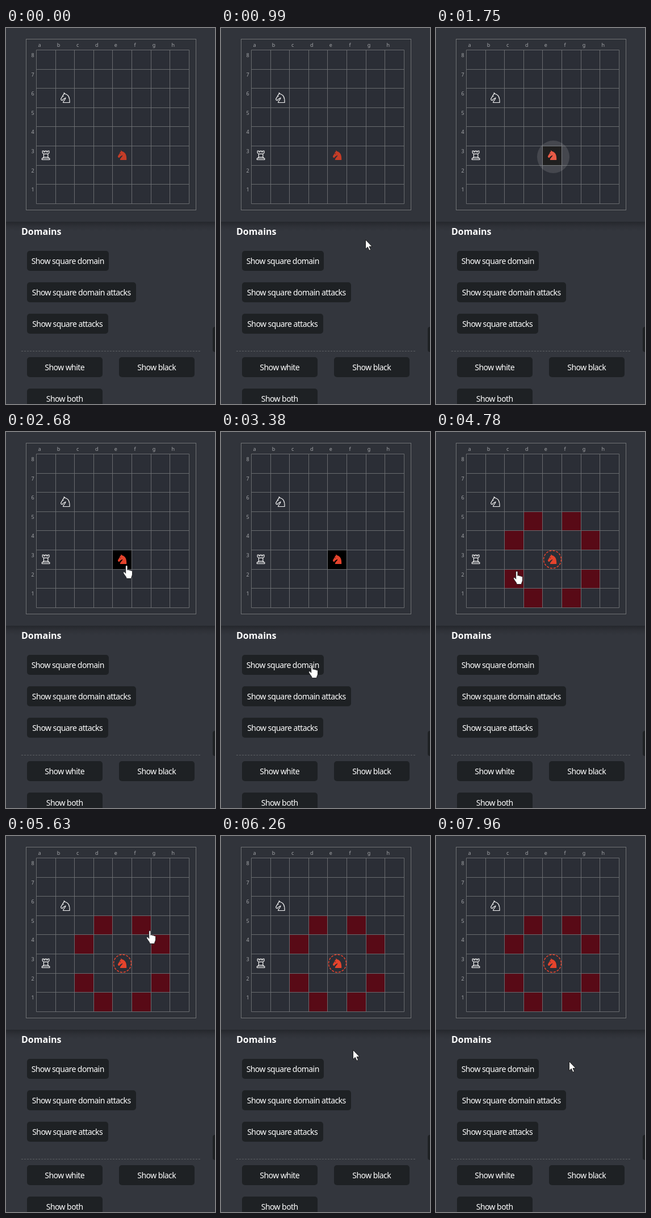
An HTML page that plays this animation: 368x658 px, repeating every 8000 ms.

```html
<!DOCTYPE html>
<html lang="en">
<head>
<meta charset="utf-8">
<title>Board domains</title>
<style>
  html, body { margin: 0; width: 100%; height: 100%; overflow: hidden; background: #33363d; }
  svg { display: block; width: 368px; height: 658px; }
  text { font-family: "Noto Sans", "Open Sans", sans-serif; fill: #fff; }
  .btn text { font-size: 14px; letter-spacing: -.57px; text-anchor: middle; }
  .btn rect { fill: #1e2124; }
  .label { font-size: 9px; fill: #a3a5a8; text-anchor: middle; }
  .title { font: 700 16px "Open Sans", "Noto Sans", sans-serif; }
</style>
</head>
<body>
<svg viewBox="0 0 368 658">
  <defs>
    <linearGradient id="shade" x1="0" y1="0" x2="0" y2="1">
      <stop offset="0" stop-color="#1d1f23" stop-opacity=".65"/>
      <stop offset=".5" stop-color="#1d1f23" stop-opacity=".22"/>
      <stop offset="1" stop-color="#1d1f23" stop-opacity="0"/>
    </linearGradient>
    <path id="horse" d="M6 0 L8.2 2 C13 3 16.3 7.5 15.8 17 H4.4 C4.4 13.4 8.8 11.8 8.8 8.6 C7.2 10 5.6 10 4.6 11.2 L3 13.2 L1 12.6 L.5 10.6 L3.8 5 C4 3.6 5 3 5.8 2.6 Z"/>
  </defs>
  <rect width="368" height="339" fill="#31343b"/>
  <rect y="339" width="368" height="16" fill="url(#shade)"/>
  <rect x="35.5" y="19.5" width="299" height="299" fill="#2e3138" stroke="#707275"/>
  <rect x="54" y="39" width="268" height="268" fill="#2b2e36"/>
  <g id="marks" fill="#580a16"></g>
  <path id="grid" fill="none" stroke="#707275" stroke-width=".9"/>
  <rect id="picked" x="188" y="207" width="33" height="33"/>
  <g id="labels"></g>

  <g fill="none" stroke="#f4f4f4" stroke-width="1.2" stroke-linejoin="round">
    <use href="#horse" x="96.2" y="113.5"/>
    <path d="M64.2 215 V218.6 L66.4 220.4 V226 L64.6 228 H63.4 V230.5 H76.8 V228 H75.6 L73.8 226 V220.4 L76 218.6 V215 H73.4 V216.8 H71.4 V215 H68.8 V216.8 H66.8 V215 Z M66.4 220.4 H73.8 M66.4 226 H73.8 M64.6 228 H75.6"/>
  </g>
  <circle cx="100.8" cy="119.6" r=".8" fill="#f4f4f4"/>
  <g id="red">
    <use href="#horse" x="196.4" y="214"/>
    <circle cx="201.3" cy="220" r=".8" fill="#2b2e36"/>
  </g>
  <circle id="ring" cx="205" cy="223" r="15.5" fill="none" stroke="#e5432c" stroke-width="1.5" stroke-dasharray="4 2.09"/>

  <text class="title" x="27" y="361.5">Domains</text>
  <line x1="27" x2="342" y1="565.5" y2="565.5" stroke="#5d6064" stroke-dasharray="3 2.03"/>
  <g id="buttons" class="btn"></g>
  <rect x="364" y="523" width="12" height="44" rx="4" fill="#1e2124"/>

  <circle id="ripple" r="28.5" fill="#fff"/>
  <path id="hand" fill="#fff" stroke="#17181b" stroke-width=".9" stroke-linejoin="round"
    d="M-1.3 2.2 C-1.3 .1 1.9 .1 1.9 2.2 V8.6 C2.5 7.5 4.8 7.7 5 9.2 C5.8 8.2 7.6 8.6 7.8 10 C8.8 9.2 10.5 9.8 10.5 11.5 V16 C10.5 19 8.5 20 8.5 23.5 H.2 C.2 20.5 -3.2 18 -5.2 14 C-6 12 -3.8 11 -2.6 12.6 L-1.3 14.3 Z"/>
  <path id="arrow" fill="#fff" stroke="#111" stroke-width=".9" stroke-linejoin="round"
    d="M.5 .5 V16.8 L4.3 13.3 L7 19.3 L9.6 18.2 L7 12.4 H12 Z"/>
</svg>
<script>
const LOOP = 8000, STEP = 77;
const CELL = 33.6, LEFT = 53.5, TOP = 38.5, SIZE = 269;
const $ = id => document.getElementById(id);

function add(parent, tag, attrs, text) {
  const el = document.createElementNS("http://www.w3.org/2000/svg", tag);
  for (const k in attrs) el.setAttribute(k, attrs[k]);
  if (text) el.textContent = text;
  $(parent).append(el);
}

// Grid lines snap to pixel centres
const snap = (from, i) => Math.floor(from + i * CELL) + .5;
const colX = i => snap(LEFT, i), rowY = i => snap(TOP, i);

let lines = "";
for (let i = 0; i <= 8; i++) {
  lines += `M${colX(i)} ${TOP}v${SIZE}M${LEFT} ${rowY(i)}h${SIZE}`;
}
$("grid").setAttribute("d", lines);

for (let i = 0; i < 8; i++) {
  add("labels", "text", { class: "label", x: 59 + i * CELL, y: 33 }, "abcdefgh"[i]);
  add("labels", "text", { class: "label", x: 47, y: 51 + i * CELL }, String(8 - i));
}

// A knight on e3 reaches every square whose offsets multiply to two
for (let c = 0; c < 8; c++) for (let r = 0; r < 8; r++) {
  if (Math.abs((c - 4) * (r - 5)) === 2) {
    add("marks", "rect", { x: colX(c), y: rowY(r), width: CELL, height: CELL });
  }
}

const buttons = [];
function button(x, y, w, caption) {
  buttons.push([x, y, w, 35]);
  add("buttons", "rect", { x, y, width: w, height: 35, rx: 5 });
  add("buttons", "text", { x: x + w / 2 - .3, y: y + 23 }, caption);
}
[["domain", 144], ["domain attacks", 192], ["attacks", 143]]
  .forEach(([what, w], i) => button(37, 390 + i * 55, w, "Show square " + what));
["white", "black", "both"]
  .forEach((what, i) => button(37 + i % 2 * 162, 576 + (i >> 1) * 55, 133, "Show " + what));

// Each pointer move follows a Bezier curve through its control points
const moves = [
  { start: 520, end: 1290, curve: [[338, 631], [208, 228]] },
  { start: 2600, end: 3380, curve: [[210, 228], [250, 320], [160, 407]] },
  { start: 4240, end: 5010, curve: [[168, 399], [300, 330], [104, 280], [137, 190]] },
  { start: 5080, end: 5860, curve: [[139, 178], [145, 135], [271, 137], [265, 195]] },
  { start: 5940, end: 6260, curve: [[269, 208], [276, 275], [232, 374]] },
  { start: 7820, end: 7960, curve: [[228, 379], [234, 394]] }
];
const clicks = [
  { start: 1750, end: 1980, x: 206.5, y: 225.5 },
  { start: 3620, end: 3770, x: 162, y: 406.5 }
];

const mix = (a, b, u) => a + (b - a) * u;
const ease = u => u * u * (3 - 2 * u);

function bezier(pts, u) {
  if (pts.length === 1) return pts[0];
  return bezier(pts.slice(1).map((b, i) => b.map((v, k) => mix(pts[i][k], v, u))), u);
}

// Share of a stretch reached at time t, in whole steps
function share(t, { start, end }) {
  const n = Math.round((end - start) / STEP);
  return Math.min(1, Math.floor((t - start + 5) / (end - start) * n) / n);
}

const inside = (x, y, [l, t, w, h]) => x >= l && x <= l + w && y >= t && y <= t + h;
const clickable = (x, y) => [[LEFT, TOP, SIZE, SIZE], ...buttons].some(b => inside(x, y, b));
const show = (id, on) => { $(id).style.display = on ? "" : "none"; };

function draw(t) {
  const [first, second] = clicks;
  const picked = t >= first.start, marked = t >= second.start;
  show("picked", picked && !marked);
  show("marks", marked);
  show("ring", marked);
  $("red").setAttribute("fill", picked ? "#e5432c" : "#c43c27");

  const click = clicks.find(c => t >= c.start && t < c.end);
  show("ripple", click);
  if (click) {
    $("ripple").setAttribute("cx", click.x);
    $("ripple").setAttribute("cy", click.y);
    $("ripple").setAttribute("opacity", .12 * (1 - share(t, click)));
  }

  // A click hides the pointer until it moves again
  const move = moves.filter(m => t >= m.start).pop();
  let kind = "";
  if (move && !clicks.some(c => c.start > move.start && t >= c.start)) {
    const [x, y] = bezier(move.curve, ease(share(t, move))).map(Math.round);
    kind = clickable(x, y) ? "hand" : "arrow";
    $(kind).setAttribute("transform", `translate(${x} ${y})`);
  }
  show("hand", kind === "hand");
  show("arrow", kind === "arrow");
}

const born = performance.now();
function tick() {
  draw((performance.now() - born) % LOOP);
  requestAnimationFrame(tick);
}
tick();
</script>
</body>
</html>
```
